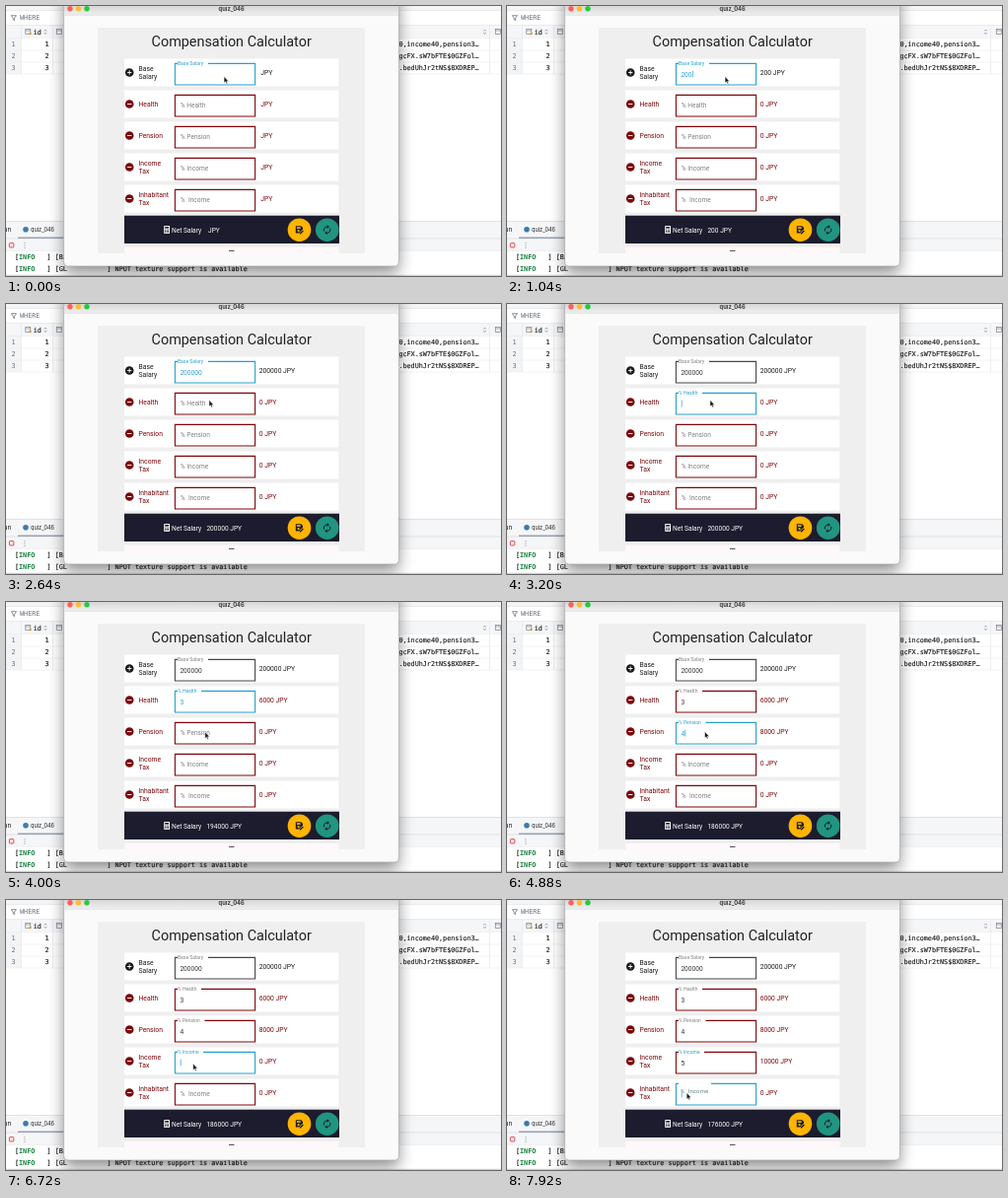
Recreate the animation shown at these times as an HTML page. Size 502 by 274 pixels, loop 8 s.

```html
<!DOCTYPE html>
<html lang="en">
<head>
<meta charset="utf-8">
<title>Compensation Calculator</title>
<style>
html, body { margin: 0; width: 100%; height: 100%; overflow: hidden; background: #fff; }
svg { display: block; width: 100vw; height: 100vh; }
text { white-space: pre; font-family: Roboto, sans-serif; font-size: 6.8px; }
.mono { font-family: "DejaVu Sans Mono", monospace; font-size: 6.75px; fill: #1c1c1c; stroke: #1c1c1c; stroke-width: .15px; }
.soft { fill: #6c707e; stroke: none; }
.info { fill: #12813b; stroke: none; font-weight: 700; }
.ui { font-family: Inter, sans-serif; }
</style>
</head>
<body>
<svg id="stage" viewBox="0 0 502 274">
  <defs>
    <filter id="shadow" x="-20%" y="-20%" width="140%" height="140%">
      <feGaussianBlur stdDeviation="8"/>
    </filter>
    <linearGradient id="bar" x1="0" y1="0" x2="0" y2="1">
      <stop offset=".3" stop-color="#d6d5d6"/>
      <stop offset="1" stop-color="#f0eff0"/>
    </linearGradient>
    <clipPath id="panelClip"><rect x="93" y="22" width="271" height="229"/></clipPath>
  </defs>
  <g id="ide"></g>
  <g id="app"></g>
  <g id="fields"></g>
  <path id="mouse" d="M0 0V6.6L1.5 5.3L2.5 7.5L3.6 7L2.6 4.9H4.6Z" fill="#111" stroke="#fff" stroke-width=".5"/>
</svg>
<script>
const LOOP = 8000, STEP = 80;
const BLUE = [38, 160, 205], RED = [124, 6, 10], GREY = [128, 128, 128], DARK = [70, 70, 70];
const rgb = c => `rgb(${c.map(Math.round)})`;
const lerp = (a, b, p) => a + (b - a) * p;
const mix = (a, b, p) => a.map((v, i) => lerp(v, b[i], p));
const unit = v => Math.max(0, Math.min(1, v));
const $ = id => document.getElementById(id);

function add(parent, tag, attrs, content) {
  const el = document.createElementNS("http://www.w3.org/2000/svg", tag);
  set(el, attrs);
  if (content !== undefined) el.textContent = content;
  parent.appendChild(el);
  return el;
}
function set(el, attrs) {
  for (const k in attrs) el.setAttribute(k, attrs[k]);
}
const rect = (g, x, y, width, height, fill, more) => add(g, "rect", { x, y, width, height, fill, ...more });
const circle = (g, cx, cy, r, fill) => add(g, "circle", { cx, cy, r, fill });
const line = (g, d, stroke, width = 1) => add(g, "path", { d, stroke, "stroke-width": width, fill: "none" });
const label = (g, x, y, s, fill, more) => add(g, "text", { x, y, fill, ...more }, s);
const mono = (g, x, y, s, kind = "") => add(g, "text", { x, y, class: "mono " + kind }, s);

function drawIde() {
  const g = $("ide");
  rect(g, 0, 0, 502, 274, "#fff");
  rect(g, 0, 0, 502, 4, "#f4f5f7");
  line(g, "M0 4.5H502M0 19.5H502", "#e0e2e6", .7);
  rect(g, 0, 20, 502, 12, "#f5f6f8");
  rect(g, 0, 32, 15, 37, "#f3f4f6");
  line(g, "M0 32.5H502M0 45H502M0 57H502M0 69H502", "#e9ebee", .6);
  line(g, "M15.5 20V69M47.5 20V69M490.5 20V69", "#e0e2e6", .6);
  line(g, "M5.3 9.7H10.5L8.6 12.2V14.6L7.2 13.8V12.2Z", "#6c707e", .8);
  mono(g, 14, 14.3, "WHERE", "soft");
  for (const x of [19.8, 51.3, 496.3]) {
    rect(g, x, 23.4, 5, 5, "none", { stroke: "#7a7f8c", "stroke-width": .7 });
    line(g, `M${x} 25H${x + 5}`, "#7a7f8c", .6);
  }
  circle(g, 24.6, 28, 1.2, "#d9a126");
  mono(g, 27.7, 28.6, "id");
  for (const x of [40, 485.5]) line(g, `M${x - 1.3} 25.5L${x} 24L${x + 1.3} 25.5M${x - 1.3} 27L${x} 28.5L${x + 1.3} 27`, "#6c707e", .6);
  const cells = ["0,income40,pension3…", "gcFX.sW7bFTE$0GZFol…", ".bedUhJr2tNS$8XDREP…"];
  cells.forEach((s, i) => {
    const y = 41.4 + 12 * i;
    mono(g, 5.4, y, i + 1, "soft");
    mono(g, 39.5, y, i + 1);
    mono(g, 398.4, y, s);
  });

  rect(g, 0, 218, 502, 56, "#f5f6f8");
  line(g, "M0 218.5H502M0 236H502", "#d7dae0", .7);
  rect(g, 0, 248, 502, 26, "#fff");
  label(g, -2.6, 229.3, "un", "#222", { class: "ui" });
  circle(g, 20, 226.7, 2.8, "#3d7aab");
  label(g, 25, 229, "quiz_046", "#222", { class: "ui", style: "font-size:5.6px" });
  line(g, "M12 235.2H59", "#9aa3b2", 1.5);
  rect(g, 3.4, 240.6, 4.4, 4.4, "#fbe4e4", { stroke: "#d6404b", "stroke-width": .9, rx: .7 });
  for (const y of [240.8, 243, 245.2]) circle(g, 19, y, .5, "#6c707e");
  line(g, "M0 248.3H502", "#e2e4e8", .6);
  const log = ["[Base        ]", "[GL          ] NPOT texture support is available"];
  log.forEach((s, i) => {
    const y = 257.2 + 12 * i;
    mono(g, 9, y, "[       ] " + s);
    mono(g, 13.06, y, "INFO", "info");
  });
  rect(g, 0, 272.8, 502, 1.2, "#d0d3d9");
}

function drawApp() {
  const g = $("app");
  rect(g, 59, -10, 339, 281, "#000", { opacity: .45, filter: "url(#shadow)" });
  rect(g, 58.6, -10, 339.8, 274, "#fafafa", { rx: 4, stroke: "#a9a9a9", "stroke-width": .7 });
  rect(g, 59, -5, 339, 14, "url(#bar)");
  line(g, "M59 9.3H398", "#d4d4d4", .6);
  ["#fe5f57", "#febc2e", "#28c840"].forEach((c, i) => circle(g, 65 + 8.5 * i, 2.8, 2.7, c));
  label(g, 228.7, 5, "quiz_046", "#3b3b3b", { "text-anchor": "middle", class: "ui", style: "font-weight:700;font-size:5.8px" });

  const p = add(g, "g", { "clip-path": "url(#panelClip)" });
  rect(p, 93, 22, 271, 229, "#efefef");
  label(p, 228.7, 41, "Compensation Calculator", "#212121", { "text-anchor": "middle", style: "font-size:14.4px" });
  rect(p, 120, 212.7, 218, 28.3, "#1c1c2e");
  rect(p, 120, 244.8, 217.5, 20, "#fff7fa");
  line(p, "M226 248.4H231.5", "#333", .9);

  rect(g, 160.2, 223, 5.8, 8, "#fff", { rx: .7 });
  rect(g, 161.2, 224, 3.8, 1.6, "#1c1c2e");
  for (let i = 0; i < 9; i++) rect(g, 161.2 + 1.4 * (i % 3), 226.6 + 1.35 * Math.floor(i / 3), 1, .9, "#1c1c2e");
  label(g, 168, 229.6, "Net Salary", "#fff", { style: "font-size:6.6px" });

  circle(g, 297.5, 227.2, 11.8, "#ffb400");
  circle(g, 325.7, 227.2, 11.8, "#21957f");
  add(g, "path", { d: "M293.8 223.3H299.4L301 224.9V226.4L297 230.6H293.8Z", fill: "#1c1c2e" });
  rect(g, 294.9, 224.3, 3.8, 1.6, "#ffb400");
  circle(g, 296.6, 228.2, 1.1, "#ffb400");
  line(g, "M298 231.3L301.4 227.9", "#1c1c2e", 1.4);
  line(g, "M322.6 228.6A3.2 3.2 0 0 1 326 224.1M328.6 225.8A3.2 3.2 0 0 1 325.2 230.3", "#1c1c2e", 1);
  add(g, "path", { d: "M325.7 222.3L327.9 224.1L325.7 225.9ZM325.5 228.5L323.3 230.3L325.5 232.1Z", fill: "#1c1c2e" });
}

// gap: where the top border resumes; typed: [time, value]
const rows = [
  { name: ["Base", "Salary"], hint: "Base Salary", gap: 205, focus: -600, blur: 2760,
    typed: [[400, "2"], [640, "20"], [880, "200"], [1120, "2000"], [1400, "20000"], [1680, "200000"]] },
  { name: ["Health"], hint: "% Health", gap: 198, focus: 2760, blur: 4090, typed: [[3280, "3"]] },
  { name: ["Pension"], hint: "% Pension", gap: 201.5, focus: 4090, blur: 5680, typed: [[4640, "4"]] },
  { name: ["Income", "Tax"], hint: "% Income", gap: 200, focus: 5680, blur: 7894, typed: [[7040, "5"]] },
  { name: ["Inhabitant", "Tax"], hint: "%  Income", gap: 207, focus: 7894, blur: 9e9, typed: [] }
];

function buildRow(r, i) {
  const g = $("fields"), y = r.y = 67.5 + 32 * i;
  r.tone = i ? RED : [26, 26, 26];
  r.edge = i ? RED : DARK;
  const c = rgb(r.tone);
  rect(g, 120, y - 14, 217.3, 28, "#fff");
  circle(g, 125.2, y, 4.3, c);
  line(g, `M123 ${y}H127.4` + (i ? "" : `M125.2 ${y - 2.2}V${y + 2.2}`), "#fff", .9);
  r.name.forEach((s, k) => label(g, 134.5, y + 2.4 + (r.name.length > 1 ? 8 * k - 3.9 : 0), s, c));
  r.box = line(g, "", c, 1.1);
  r.label = label(g, 0, 0, r.hint);
  r.input = label(g, 176.4, y + 4, "", "", { style: "font-size:6.6px" });
  r.caret = rect(g, 0, y - 2, .7, 7, rgb(BLUE));
  r.sum = label(g, 256.7, y + 2.3, "", c, { style: "font-size:6.75px" });
}

function drawRow(r, t, base) {
  const last = r.typed.filter(k => t >= k[0]).pop();
  const value = last ? last[1] : "", active = t >= r.focus && t < r.blur;
  const q = unit((t - r.focus) / 200), p = 1 - (1 - q) * (1 - q);
  const tint = active ? p : t < r.focus ? 0 : 1 - unit((t - r.blur) / 200);
  const top = r.y - 9.1, end = q > 0 ? r.gap : 174;
  set(r.box, {
    d: `M${end} ${top}H252.6V${r.y + 12.5}H171.4V${top}H174`,
    stroke: rgb(active ? BLUE : r.edge)
  });
  set(r.label, {
    x: lerp(176.8, 174, p), y: lerp(r.y + 3.7, r.y - 7.8, p),
    fill: rgb(mix(GREY, BLUE, tint)), style: `font-size:${lerp(6.6, 5, p)}px`
  });
  r.input.textContent = value;
  r.input.setAttribute("fill", active ? rgb(BLUE) : "#333");
  const since = t - (last ? last[0] : r.focus);
  set(r.caret, {
    x: 176.8 + 3.71 * value.length,
    opacity: active && since % 1000 < 500 ? 1 : 0
  });
  const amount = r === rows[0] ? value : base && base * value / 100;
  r.sum.textContent = amount + " JPY";
  return amount;
}

// time, x, y
const path = [[0, 221.1, 71.5], [1800, 221.1, 71.5], [2480, 206, 97.5], [3400, 206, 97.5], [3920, 202.1, 132],
  [4240, 200.5, 131.5], [5200, 200.5, 131.5], [5640, 189.7, 166], [7240, 189.7, 166], [7800, 182.2, 195.6], [8000, 182.2, 195.6]];

function moveMouse(t) {
  const i = path.findIndex(k => k[0] > t), [t0, x0, y0] = path[i - 1], [t1, x1, y1] = path[i];
  const q = (t - t0) / (t1 - t0), p = q * q * (3 - 2 * q);
  $("mouse").setAttribute("transform", `translate(${lerp(x0, x1, p)} ${lerp(y0, y1, p)})`);
}

drawIde();
drawApp();
rows.forEach(buildRow);
const net = label($("fields"), 203.4, 229.6, "", "#fff", { style: "font-size:6.6px" });

function render(now) {
  const t = Math.floor(now % LOOP / STEP) * STEP;
  const base = drawRow(rows[0], t);
  const cuts = rows.slice(1).reduce((sum, r) => sum + Number(drawRow(r, t, base)), 0);
  net.textContent = (base && base - cuts) + " JPY";
  moveMouse(t);
}
function tick(now) {
  render(now);
  requestAnimationFrame(tick);
}
render(0);
requestAnimationFrame(tick);
</script>
</body>
</html>
```
